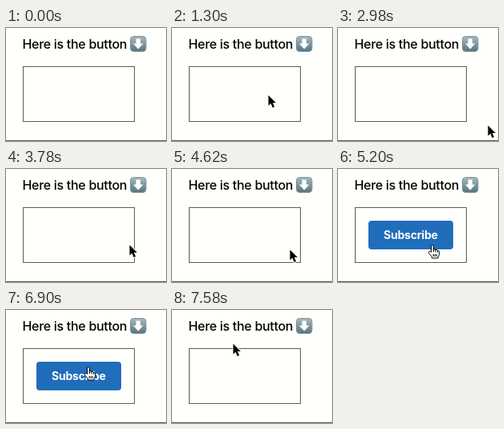
Animation of 200x142 px, one loop 8 s. Source, as an HTML page:

```html
<!DOCTYPE html>
<html lang="en">
<head>
<meta charset="utf-8">
<title>Subscribe button</title>
<style>
  html, body { margin: 0; width: 100%; height: 100%; overflow: hidden; background: #fffffb; }
  svg { display: block; width: 200px; height: 142px; }
  text { font-family: Inter, "Liberation Sans", sans-serif; }
</style>
</head>
<body>
<svg viewBox="0 0 200 142">
  <defs>
    <linearGradient id="tile" x2="0" y2="1">
      <stop stop-color="#a9b9c0"/>
      <stop offset="1" stop-color="#567480"/>
    </linearGradient>
  </defs>

  <text x="20.5" y="26" font-size="16" font-weight="500" letter-spacing="-.3">Here is the button</text>
  <rect x="155.5" y="10.5" width="19.5" height="19" rx="4" fill="url(#tile)" stroke="#7f949c"/>
  <path d="M162.5 13.5h5.5v6h3.5l-6.2 7-6.3-7h3.5z" fill="#fff"/>

  <rect x="21.5" y="48.5" width="139" height="69" fill="none" stroke="#5c5c54"/>
  <path d="M0 141.5h200" stroke="#5c5c54"/>

  <g id="button">
    <rect x="38" y="65" width="106" height="36" rx="4" fill="#206dbc"/>
    <text x="57" y="88" font-size="14" font-weight="700" letter-spacing="-.2" fill="#fff">Subscribe</text>
  </g>

  <g id="cursor" stroke-linejoin="round">
    <path id="arrow" d="M0 .5V13.5L3 10.8 5.2 16 7.6 15 5.4 9.9H9.4Z" transform="translate(-.5 0)"
      stroke="#fff" stroke-width="2" paint-order="stroke"/>
    <path id="hand" d="M-1.5 8.5V1.2Q-1.3-.4 .1-.4T1.5 1.2V5.2Q2.9 4.2 4 5.6 5.4 4.8 6.4 6.4 8.5 6 8.5 8.2V10.8Q8.3 13 7 14.2V16H-.7V14.3L-4.6 9.6Q-5.2 8-3.8 7.6-2.6 7.4-1.5 8.5ZM1.5 5.2V8.2M4 5.6V8.5M6.4 6.4V8.8M1.2 11V14M3.2 11V14M5.2 11V14"
      transform="translate(0 -1)" fill="#fff" stroke="#000"/>
  </g>
</svg>
<script>
const LOOP = 8000, SHOW = 4720, HIDE = 7080;
const $ = id => document.getElementById(id);

// Each move eases the cursor to a new spot: start, end, x, y. It rests in between.
const moves = [
  [0, 450, 173, 121],
  [600, 1300, 121, 84],
  [1420, 1700, 100, 77],
  [1960, 2560, 173, 122],
  [2700, 2980, 188, 122],
  [3080, 3380, 152, 114],
  [3520, 3750, 155, 95],
  [3750, 4240, 183, 121],
  [4340, 4620, 148, 101],
  [4620, 5060, 118, 97],
  [5340, 5460, 147, 105],
  [5460, 5780, 126, 97],
  [5920, 6350, 121, 121],
  [6350, 6900, 103, 73],
  [6900, 7460, 77, 42]
];

function cursorAt(t) {
  let x = 206, y = 146;
  for (const [start, end, toX, toY] of moves) {
    const u = Math.min(Math.max((t - start) / (end - start), 0), 1);
    const ease = u * u * (3 - 2 * u);
    x += (toX - x) * ease;
    y += (toY - y) * ease;
  }
  return [Math.round(x), Math.round(y)];
}

function show(id, on) {
  $(id).style.display = on ? "" : "none";
}

function draw(t) {
  const [x, y] = cursorAt(t);
  const shown = t >= SHOW && t < HIDE;
  const over = shown && x >= 38 && x < 144 && y >= 65 && y < 101;
  show("button", shown);
  show("hand", over);
  show("arrow", !over);
  $("cursor").setAttribute("transform", `translate(${x} ${y})`);
}

const start = performance.now();
function tick() {
  draw((performance.now() - start) % LOOP);
  requestAnimationFrame(tick);
}
tick();
</script>
</body>
</html>
```
